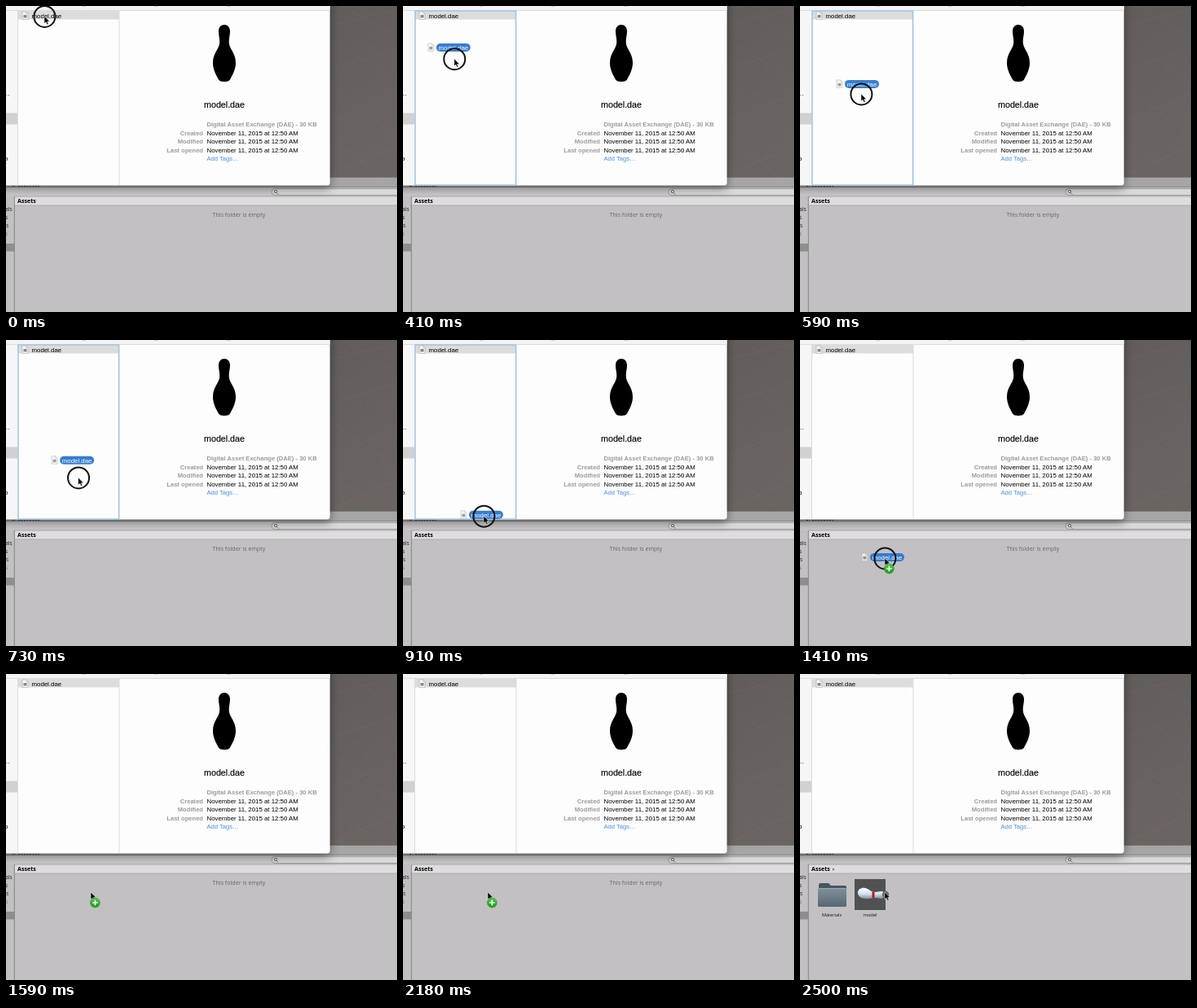
An HTML page that plays this animation: 480 px wide and 376 px high, repeating every 2.55 s.

```html
<!DOCTYPE html>
<html lang="en">
<head>
<meta charset="utf-8">
<title>Dragging a model into the assets folder</title>
<style>
html, body { margin: 0; height: 100%; overflow: hidden; background: #c2c0c2; }
svg { display: block; width: 100vw; height: 100vh; }
.finder { font: 7.85px "Liberation Sans", Arial, sans-serif; }
.label { font-weight: bold; font-size: 7.6px; fill: #9b9b9b; }
.editor { font: 7.1px "Open Sans", sans-serif; }
.end { text-anchor: end; }
.mid { text-anchor: middle; }
</style>
</head>
<body>
<svg viewBox="0 0 480 376" preserveAspectRatio="none">
  <defs>
    <linearGradient id="ground" x1="0" y1="0" x2=".3" y2="1">
      <stop stop-color="#5f5c59"/><stop offset="1" stop-color="#6b6562"/>
    </linearGradient>
    <linearGradient id="folder" x1="0" y1="0" x2="0" y2="1">
      <stop stop-color="#81929d"/><stop offset="1" stop-color="#566773"/>
    </linearGradient>
    <linearGradient id="pinShade" x1="0" y1="0" x2="0" y2="1">
      <stop stop-color="#fff"/><stop offset=".55" stop-color="#d5e3ee"/><stop offset="1" stop-color="#7d8c99"/>
    </linearGradient>
    <linearGradient id="badge" x1="0" y1="0" x2="0" y2="1">
      <stop stop-color="#52cb4c"/><stop offset="1" stop-color="#199c1b"/>
    </linearGradient>
    <filter id="shadow" x="-10%" y="-10%" width="120%" height="125%">
      <feDropShadow dx="0" dy="4" stdDeviation="6" flood-opacity=".42"/>
    </filter>
    <g id="page">
      <path d="M0 0h5l2 2v7.500h-7z" fill="#f6f6f6" stroke="#aaa" stroke-width=".6"/>
      <path d="M1.500 4h4v3.500h-4z" fill="#888"/>
      <path d="M4.500 0v2.500h2.500" fill="none" stroke="#aaa" stroke-width=".5"/>
    </g>
  </defs>

  <!-- Editor: scene view and project panel -->
  <rect x="380" width="100" height="211" fill="url(#ground)"/>
  <path d="M398 24L480 4M398 78L480 52M398 142L480 108M398 208L480 172M412 0L480 38M398 40L480 92M398 98L480 160M398 162L462 210"
    fill="none" stroke="#8d7f7a" stroke-width=".7" opacity=".22"/>
  <rect y="210" width="480" height="12" fill="#a6a5a6"/>
  <path d="M0 210.500H480" stroke="#777"/>
  <rect y="222" width="480" height="12" fill="#cac8ca"/>
  <path d="M0 222.500H480" stroke="#858585"/>
  <path d="M8 221.500h4m3 0h26" stroke="#444" stroke-dasharray="2 1.500"/>
  <rect x="326" y="224.500" width="170" height="8" rx="4" fill="#d9d8d9" stroke="#8f8f8f" stroke-width=".8"/>
  <path d="M332.300 229.500l2 2M332.700 228a1.700 1.700 0 1 1-3.400 0a1.700 1.700 0 1 1 3.400 0" fill="none" stroke="#555" stroke-width=".8"/>
  <rect y="234" width="480" height="142" fill="#c2c0c2"/>
  <rect x="10" y="234" width="470" height="11" fill="#dedcde"/>
  <path d="M10 234H480M10 245H480" stroke="#a3a2a3" stroke-width=".8"/>
  <rect y="292" width="10" height="9.500" fill="#8f8e8f"/>
  <path d="M10.300 234V376" stroke="#858485"/>
  <g class="editor">
    <text x="14" y="242.400" font-weight="bold">Assets</text>
    <g class="end" fill="#222" font-size="6.5">
      <text x="7.500" y="252">als</text><text x="2" y="261.500">s</text>
      <text x="3" y="271.500">s</text><text x="2" y="281.500" fill="#777">s</text>
    </g>
    <text id="empty" class="mid" x="286" y="258.700" fill="#666">This folder is empty</text>
    <g id="imported">
      <path d="M40 238.300l2.600 1.700l-2.600 1.700z" fill="#777"/>
      <path d="M23 260q0-3 2-3h10l3 3h17q2 0 2 2v22h-34z" fill="#465560"/>
      <rect x="22" y="263" width="35" height="23" rx="1.500" fill="url(#folder)"/>
      <path d="M23 263.500h33" stroke="#a6b4bd" stroke-width=".7"/>
      <rect x="67" y="252" width="38" height="38" fill="#515151"/>
      <path d="M71 269c0-5 5-7 9-6c5 1 7 5 12 5c3 0 5-1 8-1c5 0 5 8 0 9c-3 0-5-1-8-1c-5 0-8 2-12 1c-5 0-9-3-9-7z" fill="url(#pinShade)"/>
      <path d="M88.500 267.200l3 .8v7l-3 .2z" fill="#b31d2a"/>
      <circle cx="105" cy="271" r="4.200" fill="#686868"/>
      <path d="M104 269l3 2l-3 2z" fill="#ddd"/>
      <g class="mid" font-size="5.600" fill="#111">
        <text x="39" y="297.500">Materials</text><text x="86" y="297.500">model</text>
      </g>
    </g>
  </g>

  <!-- File browser window -->
  <g class="finder">
    <path d="M-20-20H397.600V217q0 3.300-3.300 3.300H-20z" fill="#fdfdfe" filter="url(#shadow)"/>
    <rect width="397.600" height="5.500" fill="#f3f3f3"/>
    <path d="M0 5.500H397.600" stroke="#d6d6d6" stroke-width=".8"/>
    <path d="M94 0h4m84 0h4m85 0h5" stroke="#aaa"/>
    <rect y="6" width="14" height="214" fill="#f6f6f7"/>
    <rect y="131.500" width="14" height="14" fill="#d1d1d2"/>
    <text x="-3" y="110">…</text><text x="-2" y="190">o</text>
    <path d="M14.500 6V220M139 6V220" stroke="#dadadd" stroke-width=".9"/>
    <rect x="15" y="6" width="124" height="10.500" fill="#dcdcdc"/>
    <use href="#page" x="20" y="7"/>
    <text x="31.500" y="14.500">model.dae</text>
    <rect id="target" x="15" y="6" width="123.500" height="214" fill="none" stroke="#9dc5e8" stroke-width="1.400"/>
    <path d="M268 23C272 23 275 26 275 31C275 36 273.700 39 273.700 44C273.700 53 282 57 282 70C282 78 278 85 275 90.500Q273.500 93 268 93Q262.500 93 261 90.500C258 85 254 78 254 70C254 57 262.300 53 262.300 44C262.300 39 261 36 261 31C261 26 264 23 268 23z"/>
    <text class="mid" x="268" y="124.700" font-size="10.700" stroke="#000" stroke-width=".15">model.dae</text>
    <text class="label" x="246.500" y="148">Digital Asset Exchange (DAE) - 30 KB</text>
    <g class="label end">
      <text x="242" y="158.800">Created</text><text x="242" y="169.300">Modified</text><text x="242" y="179.700">Last opened</text>
    </g>
    <g id="dates"></g>
    <text x="246.500" y="190" fill="#4a90e0" font-size="7.600">Add Tags…</text>
  </g>

  <!-- Dragged file, drawn around the pointer tip -->
  <g id="file" class="finder">
    <use href="#page" x="-28" y="-6" opacity=".8"/>
    <rect x="-18" y="-6" width="42" height="10" rx="5" fill="#2c78cf" opacity=".95"/>
    <text class="mid" x="3" y="1.800" fill="#fff">model.dae</text>
  </g>
  <g id="pointer">
    <circle id="press" cx=".4" cy=".4" r="13" fill="none" stroke="#111" stroke-width="2"/>
    <path d="M0 0V9L2.100 7.200L3.600 10.500L5.100 9.800L3.700 6.600H6.500z" fill="#000" stroke="#fff" stroke-width=".5"/>
    <g id="plus">
      <circle cx="5.400" cy="13" r="6" fill="url(#badge)" stroke="#268c26" stroke-width=".5"/>
      <path d="M2.200 13h6.400M5.400 9.800v6.400" stroke="#fff" stroke-width="1.600"/>
    </g>
  </g>
</svg>
<script>
const LOOP = 2550, START = 90, STEP = 1000 / 22;
const DRAG = 180, LEAVE = 1135, ACCEPT = 1360, DROP = 1500, IMPORT = 2225;
// time, x, y of the pointer tip
const path = [
  [90, 47, 12.5], [180, 48, 16], [320, 55, 40], [455, 67, 78], [545, 73, 97],
  [590, 75, 108], [820, 98, 211], [865, 99, 216], [1050, 99, 217], [1140, 100, 231],
  [1185, 101, 243], [1230, 101.5, 251.5], [1320, 104, 266], [1365, 104, 268]
];
const el = id => document.getElementById(id);
const show = (id, on) => el(id).style.display = on ? "" : "none";

el("dates").innerHTML = [158.8, 169.3, 179.7].map(y =>
  `<text x="246.5" y="${y}">November 11, 2015 at 12:50 AM</text>`).join("");

function place(id, time) {
  const next = path.findIndex(key => key[0] > time);
  let [, x, y] = path[next < 0 ? path.length - 1 : 0];
  if (next > 0) {
    const [t0, x0, y0] = path[next - 1], [t1, x1, y1] = path[next];
    const k = (time - t0) / (t1 - t0);
    x = x0 + (x1 - x0) * k;
    y = y0 + (y1 - y0) * k;
  }
  el(id).setAttribute("transform", `translate(${x} ${y})`);
}

function draw(elapsed) {
  const step = Math.floor((elapsed % LOOP - START + 5) / STEP);
  const time = Math.max(0, START + step * STEP);
  place("pointer", time);
  place("file", time - STEP);
  show("file", time >= DRAG && time < DROP);
  show("target", time >= DRAG && time < LEAVE);
  show("press", time < DROP);
  show("plus", time >= ACCEPT && time < IMPORT);
  show("empty", time < IMPORT);
  show("imported", time >= IMPORT);
}

const begin = performance.now();
function frame() {
  draw(performance.now() - begin);
  requestAnimationFrame(frame);
}
frame();
</script>
</body>
</html>
```
